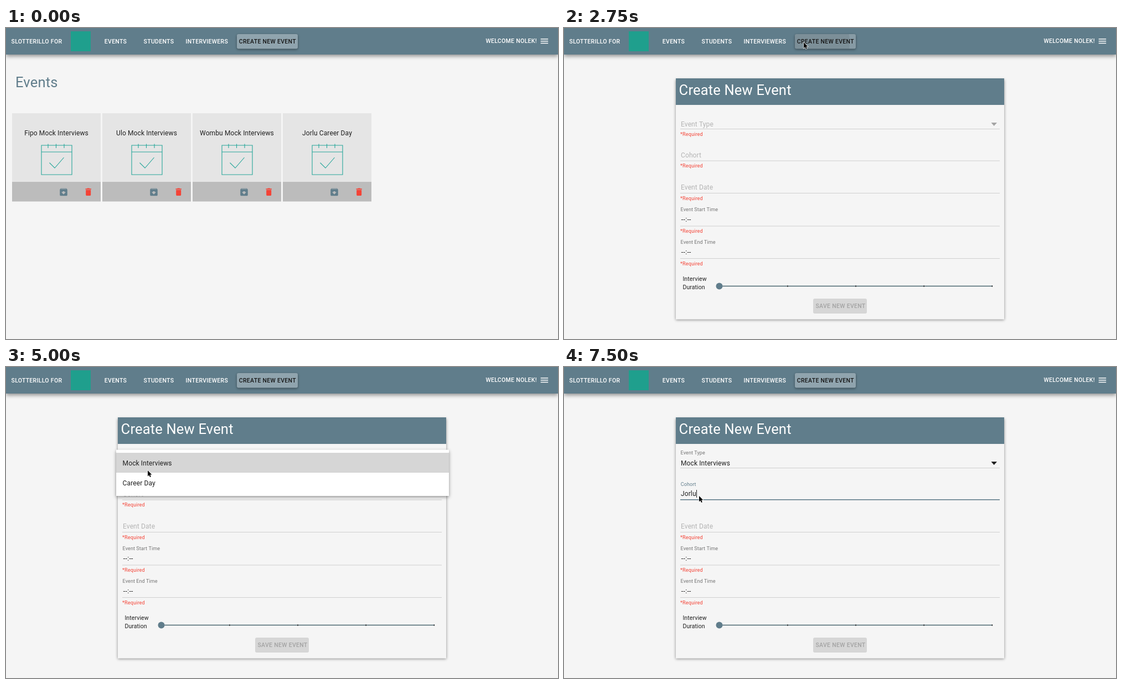
Animation of 997x562 px, one loop 8 s. Source, as an HTML page with a canvas:

```html
<!DOCTYPE html>
<html lang="en">
<head>
<meta charset="utf-8">
<title>Event planner</title>
<style>
  html, body { margin: 0; width: 100%; height: 100%; overflow: hidden; background: #f5f5f5; }
  canvas { display: block; }
</style>
</head>
<body>
<canvas id="stage" width="997" height="562"></canvas>
<script>
const ctx = document.getElementById('stage').getContext('2d');
const LOOP = 8000, STEP = 250;
const PAGE = '#f5f5f5', SLATE = '#607d8b', TEAL = '#26a69a', RED = '#f44336';
const INK = '#1f1f1f', HINT = '#b4b4b4', LABEL = '#757575', RULE = '#cfcfcf';
const COHORT = 'Jorlu';

const ARCHIVE = new Path2D('M20.54 5.23l-1.39-1.68C18.88 3.21 18.47 3 18 3H6c-.47 0-.88.21-1.16.55L3.46 5.23C3.17 5.57 3 6.02 3 6.5V19c0 1.1.9 2 2 2h14c1.1 0 2-.9 2-2V6.5c0-.48-.17-.93-.46-1.27zM12 17.5L6.5 12H10v-2h4v2h3.5L12 17.5zM5.12 5l.81-1h12l.94 1H5.12z');
const TRASH = new Path2D('M6 19c0 1.1.9 2 2 2h8c1.1 0 2-.9 2-2V7H6v12zM19 4h-3.5l-1-1h-5l-1 1H5v2h14V4z');
const MENU = new Path2D('M3 18h18v-2H3zM3 13h18v-2H3zM3 6v2h18V6z');
const POINTER = new Path2D('M0 0V10.4L2.4 8.2L4 12L5.8 11.2L4.2 7.5H7.4z');

// Pointer path as [time, x, y].
const TRACK = [
  [500, 700, 2], [750, 470, 10], [1000, 205, 22], [1250, 205, 22], [1500, 460, 22],
  [1750, 433, 26], [2750, 433, 26], [3000, 405, 65], [3250, 310, 145], [3500, 266, 181],
  [3750, 264, 183], [4250, 264, 183], [4500, 260, 187], [4750, 257, 188], [5000, 256, 187],
  [5250, 255, 187], [5500, 252, 205], [5750, 245, 230], [6000, 244, 233]
];

function rect(x, y, w, h, color) {
  ctx.fillStyle = color;
  ctx.fillRect(x, y, w, h);
}

function roundRect(x, y, w, h, r, color) {
  ctx.fillStyle = color;
  ctx.beginPath();
  ctx.roundRect(x, y, w, h, r);
  ctx.fill();
}

function shadowed(blur, dy, alpha, draw) {
  ctx.save();
  ctx.shadowColor = `rgba(0,0,0,${alpha})`;
  ctx.shadowBlur = blur;
  ctx.shadowOffsetY = dy;
  draw();
  ctx.restore();
}

function text(str, x, y, { size = 12, color = INK, weight = 400, gap = 0.0094, align = 'left' } = {}) {
  ctx.font = `${weight} ${size}px Roboto, sans-serif`;
  ctx.letterSpacing = `${gap * size}px`;
  ctx.textAlign = align;
  ctx.fillStyle = color;
  ctx.fillText(str, x, y);
}

const caps = (str, x, y, color = '#fff') =>
  text(str, x, y, { size: 10.5, weight: 500, gap: 0.0286, color });
const heading = (str, x, y, color) => text(str, x, y, { size: 25.5, gap: 0.0073, color });
const small = (str, y, color = LABEL) => text(str, 210.6, y, { size: 9, color });
const required = y => text('*Required', 210, y, { size: 9, gap: 0.018, color: RED });

function icon(path, x, y, color) {
  ctx.save();
  ctx.translate(x - 9, y - 9);
  ctx.scale(0.75, 0.75);
  ctx.fillStyle = color;
  ctx.fill(path, 'evenodd');
  ctx.restore();
}

function lines(color, width, ...paths) {
  ctx.strokeStyle = color;
  ctx.lineWidth = width;
  ctx.beginPath();
  for (const [[x, y], ...rest] of paths) {
    ctx.moveTo(x, y);
    rest.forEach(p => ctx.lineTo(...p));
  }
  ctx.stroke();
}

function drawHeader(t) {
  shadowed(7, 3, 0.42, () => rect(0, 0, 997, 48, SLATE));
  if (t >= 1000 && t < 2750) roundRect(165, 11, 65, 27, 3, '#66818e');
  caps('SLOTTERILLO FOR', 9.5, 27.7);
  rect(117, 6, 36, 36, '#1f9f8d');
  caps('EVENTS', 177.8, 27.7);
  caps('STUDENTS', 248.6, 27.7);
  caps('INTERVIEWERS', 324.6, 27.7);

  const over = t >= 1500 && t < 3000;
  shadowed(4, 1.5, 0.4, () => roundRect(417, 11, 110, 26.5, 3, over ? '#879ba5' : '#90a4ae'));
  if (t >= 2500 && t < 3000) {
    ctx.save();
    ctx.beginPath();
    ctx.roundRect(417, 11, 110, 26.5, 3);
    ctx.clip();
    ctx.fillStyle = 'rgba(0,0,0,0.08)';
    ctx.beginPath();
    ctx.arc(433, 26, t < 2750 ? 24 : 83, 0, Math.PI * 2);
    ctx.fill();
    ctx.restore();
  }
  caps('CREATE NEW EVENT', 420.8, 27.7, '#151515');
  caps('WELCOME NOLEK!', 866.4, 27);
  icon(MENU, 972.4, 23.7, '#fff');
}

function drawCard(x, title) {
  rect(x, 154, 160, 124, '#e5e5e5');
  rect(x, 278, 160, 35.5, '#bcbcbc');
  text(title, x + 80, 194, { align: 'center' });
  const l = x + 53, r = x + 108;
  lines(TEAL, 1.1,
    [[l, 212], [r, 212], [r, 265], [l, 265], [l, 211.5]],
    [[l, 224], [r, 224]],
    ...[65, 79.5, 94].map(dx => [[x + dx, 209.5], [x + dx, 217]]),
    [[x + 67.5, 243.5], [x + 77, 253], [x + 93.5, 234]]);
  icon(ARCHIVE, x + 93, 296.5, SLATE);
  icon(TRASH, x + 137.7, 296.3, RED);
}

function drawEvents() {
  heading('Events', 17, 107, SLATE);
  ['Fipo Mock Interviews', 'Ulo Mock Interviews', 'Wombu Mock Interviews', `${COHORT} Career Day`]
    .forEach((title, i) => drawCard(11 + 163 * i, title));
}

function drawTypeField(chosen) {
  if (chosen) {
    small('Event Type', 157.6);
    text('Mock Interviews', 211, 178);
  } else {
    text('Event Type', 211, 178, { color: HINT });
    required(195);
  }
  ctx.fillStyle = chosen ? INK : '#a4a4a4';
  ctx.beginPath();
  ctx.moveTo(771.5, 171);
  ctx.lineTo(782, 171);
  ctx.lineTo(776.7, 177);
  ctx.fill();
}

function drawCohortField(t) {
  const focused = t >= 6000;
  const typed = COHORT.slice(0, t < 7000 ? 0 : [1, 3, 5][Math.min(2, (t - 7000) / STEP)]);
  if (focused) {
    const rising = t < 6250;
    text('Cohort', 210.8, rising ? 220.3 : 215.2, { size: rising ? 9.8 : 9, color: SLATE });
    text(typed, 211, 233);
    const caretX = 211 + ctx.measureText(typed).width;
    if (t < 6500 || t >= 7000) rect(Math.round(caretX), 222, 1, 14, INK);
    rect(210, 239, 577, 1.5, SLATE);
  } else {
    text('Cohort', 211, 234.3, { color: HINT });
  }
  if (!typed) required(252.3);
}

function drawForm(t) {
  shadowed(5, 1.5, 0.45, () => rect(202, 91, 593, 435.5, PAGE));
  rect(202, 91, 593, 48, SLATE);
  heading('Create New Event', 207.6, 121, '#fff');
  [182, 239.5, 298, 357.5, 416].forEach(y => rect(210, y, 577, 1, RULE));
  drawTypeField(t >= 5500);
  drawCohortField(t);
  text('Event Date', 211, 292, { color: HINT });
  required(311.3);
  ['Start', 'End'].forEach((name, i) => {
    const y = 59 * i;
    small(`Event ${name} Time`, 331.4 + y);
    text('--:--', 211.8, 350 + y, { gap: 0.03 });
    required(370.3 + y);
  });

  text('Interview', 214.4, 457, { size: 10.5 });
  text('Duration', 214.4, 472, { size: 10.5 });
  rect(281, 465.7, 493, 1.5, '#4a6670');
  for (let i = 1; i <= 4; i++) rect(279.8 + 123.2 * i, 465.5, 1.6, 2, '#111');
  ctx.fillStyle = SLATE;
  ctx.beginPath();
  ctx.arc(280.5, 466.5, 6, 0, Math.PI * 2);
  ctx.fill();
  roundRect(450, 489, 97, 27, 3, '#d6d6d6');
  caps('SAVE NEW EVENT', 454.4, 506.3, '#a3a3a3');
}

function drawDropdown(t) {
  if (t < 4000 || t >= 5500) return;
  if (t < 4250) {
    lines('rgba(0,0,0,0.06)', 1, [[199.5, 225], [199.5, 152.5], [799.5, 152.5], [799.5, 225]]);
    lines('rgba(0,0,0,0.2)', 1, [[199, 225], [800, 225]]);
    return;
  }
  shadowed(6, 2, 0.42, () => rect(199, 149.5, 601, 83.5, '#fff'));
  rect(199, 155, 601, 36, '#d6d6d6');
  text('Mock Interviews', 210.6, 178);
  text('Career Day', 210.6, 214);
}

function drawPointer(t) {
  if (t < TRACK[0][0]) return;
  let i = TRACK.length - 1;
  while (TRACK[i][0] > t) i--;
  const [t0, x0, y0] = TRACK[i];
  const [t1, x1, y1] = TRACK[i + 1] || [t0 + 1, x0, y0];
  const k = Math.min(1, (t - t0) / (t1 - t0));
  ctx.save();
  ctx.translate(x0 + (x1 - x0) * k, y0 + (y1 - y0) * k);
  ctx.strokeStyle = '#fff';
  ctx.lineWidth = 1.2;
  ctx.stroke(POINTER);
  ctx.fillStyle = '#000';
  ctx.fill(POINTER);
  ctx.restore();
}

function frame() {
  const t = Math.floor((performance.now() % LOOP) / STEP) * STEP;
  rect(0, 0, 997, 562, PAGE);
  drawHeader(t);
  if (t < 2750) {
    drawEvents();
  } else {
    drawForm(t);
    drawDropdown(t);
  }
  drawPointer(t);
  requestAnimationFrame(frame);
}
frame();
</script>
</body>
</html>
```
